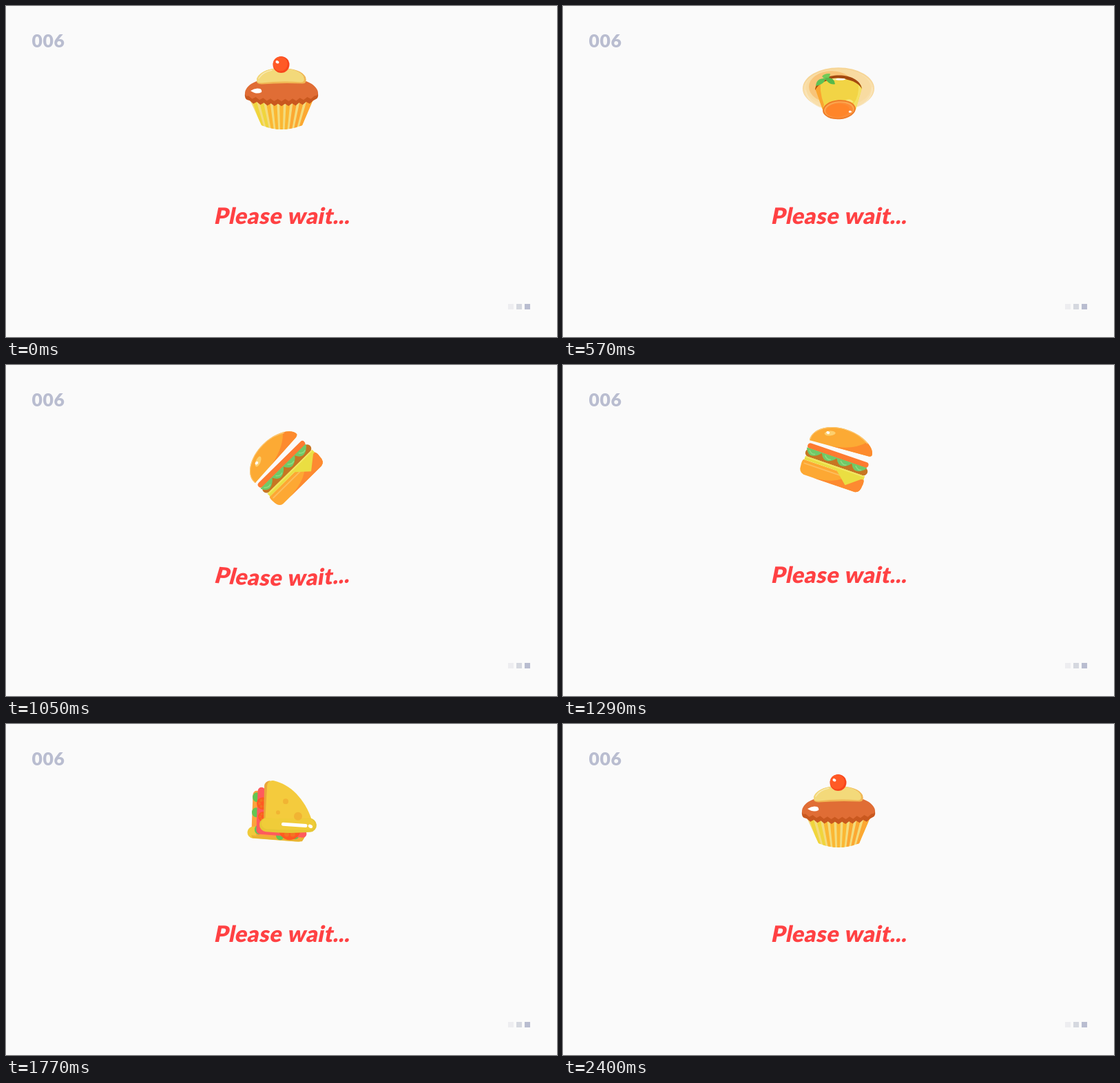
An HTML page with a canvas that plays this animation: 800 px wide and 480 px high, repeating every 2430 ms.

```html
<!DOCTYPE html>
<html lang="en">
<head>
<meta charset="utf-8">
<title>Please wait</title>
<style>
  html, body { margin: 0; width: 100%; height: 100%; overflow: hidden; background: #fafafa; }
  canvas { display: block; width: 800px; height: 480px; }
</style>
</head>
<body>
<canvas id="stage" width="800" height="480"></canvas>
<script>
const ctx = document.getElementById('stage').getContext('2d');
const LOOP = 2430, ACTIVE = 2400, HOP = 600;
const APEX = 126, HEIGHT = 106;

const fill = (color, d) => { ctx.fillStyle = color; ctx.fill(new Path2D(d)); };
const stroke = (color, width, d) => {
  ctx.strokeStyle = color;
  ctx.lineWidth = width;
  ctx.lineCap = ctx.lineJoin = 'round';
  ctx.stroke(new Path2D(d));
};
const oval = (color, x, y, rx, ry = rx, turn = 0) => {
  ctx.fillStyle = color;
  ctx.beginPath();
  ctx.ellipse(x, y, rx, ry, turn, 0, Math.PI * 2);
  ctx.fill();
};
const clipped = (d, paint) => {
  ctx.save();
  ctx.clip(new Path2D(d));
  paint();
  ctx.restore();
};

// Dome whose lower edge is a row of small teeth sagging toward the middle
function icing(color, dome, halfWidth, edge, sag) {
  let d = dome;
  const teeth = 18;
  for (let i = 0; i <= teeth; i++) {
    const u = 1 - 2 * i / teeth;
    const y = edge + sag * (1 - u * u) + (i % 2 ? 1.8 : -1.8);
    d += `L${u * halfWidth} ${y}`;
  }
  fill(color, d + 'Z');
}

function cake() {
  clipped('M-46 10H46L30 47Q0 59-29 47Z', () => {
    fill('#f3db7c', 'M-50 5H50V60H-50Z');
    const pleats = 9;
    for (let i = 0; i < pleats; i++) {
      const u = (i + 0.5) / pleats * 2 - 1;
      const color = i < 2 ? '#f0d53c' : i < 6 ? '#fbb733' : '#fca832';
      const top = u * 45, foot = u * 29;
      fill(color, `M${top - 3} 10H${top + 3}L${foot + 1.9} 55H${foot - 1.9}Z`);
    }
    fill('#fca832', 'M39 10H46L30 50H27Z');
  });
  icing('#c9581f', 'M-50 10Q-54 8-53 0Q-40-20 0-20T53 0Q54 8 50 9', 46, 13, 4.5);
  icing('#e06d35', 'M-51 5Q-55 0-51-6C-44-17-28-21 0-21S44-17 51-6Q55 0 51 4', 48, 6, 4.5);
  fill('#fff', 'M-45-3Q-38-8-31-6Q-28-4-29-1Q-36 3-45-3Z');
  fill('#f0b654', 'M-36-18C-36-28-20-36-2-36C18-36 31-31 35-23Q38-13 30-13.5Q0-15-29-12.5Q-37-13-36-18Z');
  fill('#f3d97a', 'M-36-18C-36-28-20-36-2-36C16-36 28-31 32-24Q35-15 28-15.5Q0-18-29-14.5Q-36-14-36-18Z');
  stroke('#f8e9b1', 1.3, 'M-33-21Q-28-30-14-33');
  oval('#f8461c', -0.5, -41, 12);
  oval('#ff5a26', -1.7, -42, 10.5);
  oval('#fff', -6, -44.7, 2.6, 2, 0.4);
}

function pudding() {
  ctx.rotate(0.038);
  oval('#f6d596', 0, -6.5, 52, 30.5);
  oval('#f9dfab', 0, -5.5, 51, 29);
  oval('#f8dba1', 0, -7.5, 47, 27);
  clipped('M-47-8A47 27 0 0 1 47-8A47 27 0 0 1-47-8Z', () => oval('#f8c478', -10, -9, 33, 23));
  stroke('#fae7bf', 1.2, 'M-48-4C-45 13-28 22-18 22M27 20C42 14 49 4 49-8');
  fill('#f2d445', 'M-34-7C-31-30 30-30 34-7L25 24Q0 38-23 24Z');
  fill('#fba42f', 'M-34-7Q-32-16-25-20Q-29-5-21 17L-23 24Z');
  fill('#f4e164', 'M34-7L25 24L22 15Q30 5 29-12Z');
  fill('#a4490f', 'M-34-4C-31-32 30-33 34-6C25-25-23-27-34-4Z');
  fill('#f8e991', 'M-10-21Q3-23 12-20Q3-17-8-19Z');
  oval('#fff', 3, -20, 7, 1.3);
  fill('#f8e778', 'M10 11Q16 6 22 13Q17 15 10 11Z');
  oval('#ee7926', 1, 24, 24, 14, -0.08);
  oval('#fba64e', 1, 24, 22, 12, -0.08);
  oval('#fc8b35', 1, 25, 20, 11, -0.08);
  oval('#ff8529', -1, 25, 17, 9.5, -0.08);
  oval('#fff', 17, 27, 2.2, 1.5);
  fill('#5dc254', 'M-33-10Q-32-22-19-21Q-20-13-33-10Z');
  fill('#71ca58', 'M-24-24Q-20-29-12-28Q-13-20-19-19Z');
  fill('#58b94a', 'M-20-22Q-6-24-5-13Q-14-11-20-22Z');
}

function burger() {
  const dome = 'M-47-8C-48-24-28-39 1-39C28-39 47-25 46-15Q45-13 42-12.5L-45-7Q-47-6-47-8Z';
  fill('#fcaa34', dome);
  clipped(dome, () => {
    fill('#fd8b2e', 'M-19-8Q18-13 34-32L50-28V-8Z');
    stroke('#fcc873', 2, 'M-47-8C-48-24-28-39 1-39C15-39 26-35 34-30');
  });
  oval('#fccf6e', -22, -26, 8, 3.5, -0.4);
  oval('#fff', -25, -26, 2.5, 2);

  stroke('#fd7b31', 8, 'M-43 0.5H42');
  stroke('#c77622', 12, 'M-41 10.5H42');
  clipped('M-48 4H48V18H-48Z', () => {
    let d = 'M-47 5';
    for (let i = 0; i < 4; i++) d += 'q5 10 12 8t11-8';
    fill('#70c968', d + 'V4H-47Z');
    stroke('#8fdb83', 1.5, 'M-42 7q5 5 9 3M-18 7q5 5 9 3M6 7q5 5 9 3M29 7q5 5 9 3');
  });
  fill('#fda833', 'M-46 22H46Q48 25 47 31Q47 42 39 43H-39Q-47 42-47 31Q-48 25-46 22Z');
  fill('#fd8a31', 'M23 22H46Q48 25 47 31Q47 42 39 43H-24Q15 40 23 22Z');
  stroke('#fcbd5d', 2, 'M-43 27H15');
  fill('#eade42', 'M-45 16.5H46V22H43L23 38L5 22H-45Z');
  fill('#f1e760', 'M-45 16.5H46V18.5H-45Z');
}

function tomato(x, y, r) {
  oval('#ff5a22', x, y, r);
  for (let i = 0; i < 6; i++) {
    const a = i * Math.PI / 3;
    oval('#f37422', x + Math.cos(a) * r * 0.55, y + Math.sin(a) * r * 0.55, r * 0.22);
  }
}

function sandwich() {
  ctx.rotate(0.038);
  stroke('#fba33c', 11, 'M-36-24L-38 30');
  stroke('#f0ca39', 17, 'M-41 31L25 36');
  fill('#e8b332', 'M-44 35L26 40L36 34L30 44H20L-42 39Z');
  stroke('#fba33c', 6, 'M-34 33L24 38');
  for (const [x, y] of [[-36, -20], [-37, 2], [-33, 27], [-2, 35], [20, 34]]) oval('#62c653', x, y, 6, 7);
  stroke('#ff5b5d', 11, 'M-29-29L-31 28L31 33');
  clipped('M-36-36H-18V34H-36Z', () => {
    tomato(-27, -11, 9);
    tomato(-27, 8, 7);
  });
  clipped('M-20 24H40V43H-20Z', () => tomato(12, 26, 16));
  fill('#e9a63b', 'M-25-37Q-24-43-17-44L-14-40L-18 18H-26Z');
  fill('#f4cb3d', 'M-21-37Q-20-45-11-44C12-39 34-18 44 13L44 20H-24Z');
  stroke('#e6c735', 20, 'M-22 20Q10 23 41 20.5');
  stroke('#f0cc39', 16, 'M-21 18Q10 20 40 19');
  oval('#f1b433', 6, -14, 4);
  oval('#f1b433', -5, 2, 3);
  oval('#f1b433', 24, 7.5, 6);
  stroke('#fff', 5, 'M2.5 19L35 21.3');
  oval('#fff', 42, 22, 3.3, 2.4, 0.5);
}

const foods = [cake, pudding, burger, sandwich];

// Sag of the caption: quick push down, then a fading spring
function sag(sinceHit) {
  const s = sinceHit > HOP - 30 ? sinceHit - HOP : sinceHit;
  if (s < 30) return 9.5 * (s + 30) / 60;
  if (s > 270) return 0;
  return 9.5 * (1 - (s - 30) / 240) * Math.cos((s - 30) / 120 * Math.PI * 2);
}

// Slanted upright letters set along a sagging baseline
function caption(bend) {
  const text = 'Please wait...', tracking = 0.5, slant = 0.2;
  ctx.font = '900 32.5px Lato, sans-serif';
  ctx.fillStyle = '#ff4143';
  const offset = i => ctx.measureText(text.slice(0, i)).width + i * tracking;
  const left = 400 - offset(text.length) / 2;
  for (let i = 0; i < text.length; i++) {
    const half = ctx.measureText(text[i]).width / 2;
    const x = left + offset(i) + half;
    const u = (x - 400) / 100;
    ctx.save();
    ctx.translate(x, 315.5 + bend * (1 - u * u));
    ctx.rotate(Math.atan(-2 * bend * u / 100));
    ctx.transform(1, 0, -slant, 1, 0, 0);
    ctx.fillText(text[i], -half, 0);
    ctx.restore();
  }
}

function counter() {
  ctx.save();
  ctx.font = '900 26.5px Lato, sans-serif';
  ctx.letterSpacing = '0.6px';
  ctx.fillStyle = '#b9bdd0';
  ctx.fillText('006', 37.5, 60);
  ctx.restore();
}

function draw() {
  const t = Math.min(performance.now() % LOOP, ACTIVE) + HOP / 2;
  const sinceHit = t % HOP;
  const v = sinceHit / (HOP / 2) - 1;
  const turn = Math.sign(v) * Math.PI / 4 * (1 - Math.cos(Math.PI * v));

  ctx.fillStyle = '#fafafa';
  ctx.fillRect(0, 0, 800, 480);
  counter();
  ['#ededf0', '#d5d8df', '#b9bdd0'].forEach((color, i) => {
    ctx.fillStyle = color;
    ctx.fillRect(729 + i * 12, 432, 8, 8);
  });

  caption(sag(sinceHit));
  ctx.save();
  ctx.translate(400, APEX + HEIGHT * Math.abs(v) ** 2.6);
  ctx.rotate(turn);
  foods[Math.floor(t / HOP) % foods.length]();
  ctx.restore();
  requestAnimationFrame(draw);
}
draw();
</script>
</body>
</html>
```
